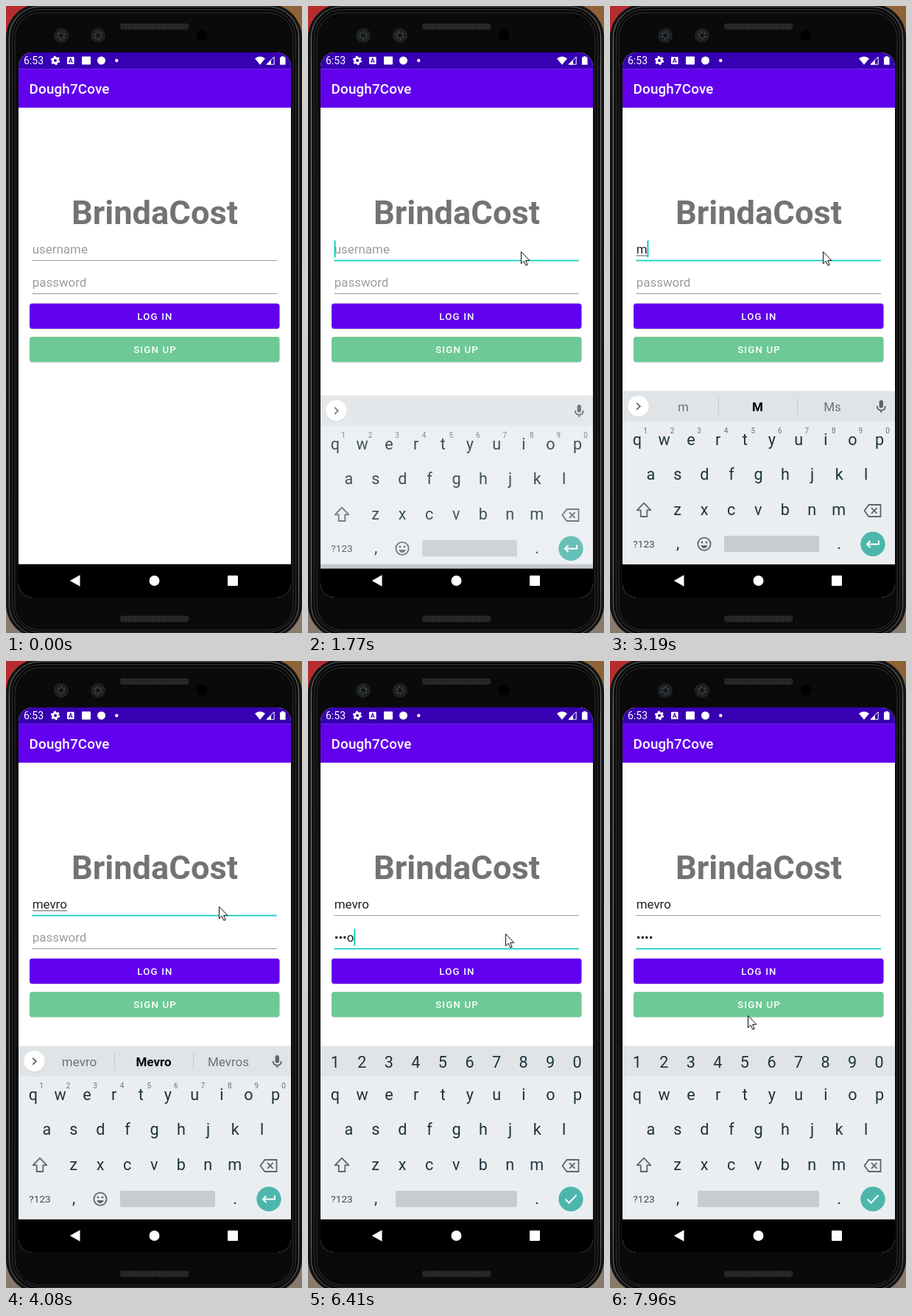
An HTML page for the animation above (8 s loop, 402x851 px).

```html
<!DOCTYPE html>
<html lang="en">
<head>
<meta charset="utf-8">
<title>Login screen</title>
<style>
  html, body { margin: 0; width: 100%; height: 100%; overflow: hidden; background: #0b0b0b; }
  svg { display: block; width: 402px; height: 851px; font-family: Roboto, Arial, sans-serif; }
  .mid { text-anchor: middle; }
  .medium { font-weight: 500; }
  .field { font-size: 16.96px; fill: #212121; }
  .hint { font-size: 16.96px; fill: #9c9c9c; }
  .btn { font-size: 13.2px; font-weight: 500; letter-spacing: 1.18px; fill: #fff; text-anchor: middle; }
  .key { font-size: 21.6px; fill: #1d333d; text-anchor: middle; }
  .sup { font-size: 10px; fill: #66737a; text-anchor: middle; }
  .sug { font-size: 17px; fill: #6a7378; text-anchor: middle; }
  .line { fill: none; stroke: #5b666c; stroke-width: 1.8; }
  .grey { fill: #5b666c; }
  .white { fill: none; stroke: #fff; stroke-width: 2; }
</style>
</head>
<body>
<svg viewBox="0 0 402 851">
  <defs>
    <clipPath id="screen"><rect x="17" y="63" width="370" height="740" rx="19"/></clipPath>
    <pattern id="mesh" width="3" height="3" patternUnits="userSpaceOnUse">
      <rect width="3" height="3" fill="#1d1d1d"/><circle cx="1.5" cy="1.5" r=".9" fill="#3c3c3c"/>
    </pattern>
    <linearGradient id="rim" x2="0" y2="1">
      <stop offset="0" stop-color="#4a4a4a"/><stop offset=".1" stop-color="#6a6a6a"/>
      <stop offset=".9" stop-color="#5c5c5c"/><stop offset="1" stop-color="#3a3a3a"/>
    </linearGradient>
  </defs>

  <!-- backdrop and phone body -->
  <rect width="402" height="851" fill="#877b6c"/>
  <rect width="201" height="400" fill="#b62d31"/>
  <rect x="201" width="201" height="400" fill="#8f6238"/>
  <rect x="0" y="-3" width="402" height="861" rx="46" fill="#131313"/>
  <rect x="4.5" y="1" width="393" height="853" rx="42" fill="#050505" stroke="url(#rim)" stroke-width="1.6"/>
  <rect x="8.5" y="5" width="385" height="845" rx="38" fill="none" stroke="#242424" stroke-width="2"/>
  <rect x="12" y="9" width="378" height="838" rx="34" fill="#0a0a0a" stroke="#333" stroke-width="1"/>
  <rect x="155" y="23.5" width="93" height="8.5" rx="3" fill="url(#mesh)"/>
  <rect x="155" y="827.5" width="93" height="8.5" rx="3" fill="url(#mesh)"/>
  <g id="cams"></g>
  <circle cx="266" cy="40" r="7.5" fill="#000"/>

  <g clip-path="url(#screen)">
    <rect x="17" y="63" width="370" height="740" fill="#fff"/>
    <rect x="17" y="63" width="370" height="22.5" fill="#3700b3"/>
    <rect x="17" y="85.3" width="370" height="52.7" fill="#6200ee"/>

    <!-- status bar -->
    <g fill="#fff">
      <text x="24" y="79.2" font-size="14">6:53</text>
      <circle cx="67" cy="74" r="3.4" fill="none" stroke="#fff" stroke-width="2.8"/>
      <circle cx="67" cy="74" r="5.2" fill="none" stroke="#fff" stroke-width="2" stroke-dasharray="2.7 2.745"/>
      <rect x="83" y="69" width="9.6" height="10" rx="1"/>
      <path d="M85.4 77l2.4-6 2.4 6M86.2 75.2h3.2" fill="none" stroke="#3700b3" stroke-width="1.1"/>
      <rect x="103" y="68.5" width="12" height="11" rx="1"/>
      <circle cx="129.5" cy="74" r="5.5"/>
      <circle cx="150.3" cy="74" r="2.2"/>
      <path d="M338 71.2q7-5.6 14 0l-7 8.6z"/>
      <path d="M354 79.2h10.2V69z" fill="none" stroke="#fff"/>
      <path d="M354 79.6l6-6v6z"/>
      <path d="M372 69.5h2v-1.3h3.6v1.3h2v10.3h-7.6z"/>
    </g>
    <text x="31.6" y="119" class="medium" font-size="18.84" letter-spacing=".15" fill="#fff">Dough7Cove</text>

    <!-- form -->
    <text x="202" y="296" class="mid" font-size="45.2" font-weight="700" fill="#737373">BrindaCost</text>
    <text id="hint1" x="35.7" y="336.3" class="hint">username</text>
    <text id="user" x="35.7" y="336.3" class="field"></text>
    <rect id="compose" x="36" y="338.4" height="1" fill="#555"/>
    <rect id="line1" x="35.5" width="332.5"/>
    <text id="hint2" x="35.7" y="381.4" class="hint">password</text>
    <text id="pass" x="35.7" y="381.4" class="field"></text>
    <rect id="line2" x="35.5" width="332.5"/>
    <rect id="caret" width="1.9" height="23" fill="#03cdbb"/>
    <rect x="32" y="405" width="339.5" height="34" rx="4" fill="#000" opacity=".13"/>
    <rect x="32" y="403.7" width="339.5" height="34.2" rx="3.6" fill="#6200ee"/>
    <text x="202.5" y="425.7" class="btn">LOG IN</text>
    <rect x="32" y="450.2" width="339.5" height="34" rx="4" fill="#000" opacity=".13"/>
    <rect x="32" y="449" width="339.5" height="34.2" rx="3.6" fill="#6dc995"/>
    <text x="202.5" y="471" class="btn">SIGN UP</text>

    <rect x="17" y="757.6" width="370" height="46" fill="#000"/>

    <g id="board">
      <rect x="17" y="522.5" width="370" height="42" fill="#e0e4e7"/>
      <rect x="17" y="564" width="370" height="193.6" fill="#eaeef1"/>
      <g id="keys"></g>

      <g id="strip">
        <circle cx="38.5" cy="544" r="14.3" fill="#000" opacity=".1"/>
        <circle cx="38.5" cy="543.3" r="14.2" fill="#fff"/>
        <path id="open" class="line" d="M36.2 538.8l4.6 4.5-4.6 4.5"/>
        <path id="close" class="line" d="M40.8 538.8l-4.6 4.5 4.6 4.5"/>
        <rect x="365.6" y="535" width="5.4" height="10.6" rx="2.7" class="grey"/>
        <path class="line" stroke-width="1.5" d="M362.8 543q0 5.8 5.5 5.8t5.5-5.8M368.3 549v3"/>
      </g>
      <g id="tools">
        <circle cx="86" cy="541.5" r="5" class="line"/>
        <path class="line" d="M89.8 545.2l6 6" stroke-width="2.2"/>
        <path class="line" d="M136 536h11a2 2 0 0 1 2 2v7l-5 5.500h-8a2 2 0 0 1-2-2v-10.500a2 2 0 0 1 2-2zM149 545h-3q-2 0-2 2v3M138 544q2 3.500 5 1.500"/>
        <path class="grey" d="M137.500 539.500h2v2h-2zM143.500 539.500h2v2h-2z"/>
        <text x="194.500" y="548.3" class="grey mid" font-size="14" font-weight="900">GIF</text>
        <rect x="242" y="536" width="15" height="15" rx="1.500" class="grey"/>
        <path d="M282.500 533v21" stroke="#c3c9cd"/>
        <g class="grey"><circle cx="310" cy="543.500" r="1.900"/><circle cx="316" cy="543.500" r="1.900"/><circle cx="322" cy="543.500" r="1.900"/></g>
      </g>
      <g id="words">
        <path d="M147.500 532v23M254.500 532v23" stroke="#c3c9cd"/>
        <text id="w0" x="99.500" y="550" class="sug"></text>
        <text id="w1" x="200.500" y="550" class="sug" style="fill:#000;font-weight:700"></text>
        <text id="w2" x="302" y="550" class="sug"></text>
      </g>

      <path class="line" d="M46 674.600l9.300 9.700h-5v8.700h-8.600v-8.700h-5z" stroke-linejoin="round"/>
      <path class="line" d="M345.500 685l6-8h16v16h-16zM355 681.200l7.600 7.600M362.600 681.200l-7.600 7.600"/>
      <text x="46" y="735.300" class="mid" font-size="13.600" fill="#3c4f58">?123</text>
      <text x="92" y="736" class="key">,</text>
      <text x="311" y="736.500" class="key">.</text>
      <rect id="space" y="719" height="22.300" rx="2" fill="#c7ccd0"/>
      <g id="emoji">
        <circle cx="128" cy="730.300" r="8.600" class="line"/>
        <circle cx="125" cy="728" r="1.400" class="grey"/><circle cx="131" cy="728" r="1.400" class="grey"/>
        <path class="grey" d="M123.300 732h9.400q-1.500 4-4.700 4t-4.700-4z"/>
      </g>
      <circle cx="357" cy="730.300" r="16.700" fill="#4db6ac"/>
      <path id="enter" class="white" d="M365 725.500v5h-15M353.500 726l-4.500 4.500 4.500 4.500"/>
      <path id="check" class="white" d="M349.500 730.500l5 5 10-10.500"/>
    </g>

    <g fill="#fff">
      <path d="M100.500 772.200v15.600l-13.700-7.800z"/>
      <circle cx="201.500" cy="780" r="7"/>
      <rect x="301" y="773" width="14" height="14" rx="1"/>
    </g>
  </g>

  <path id="mouse" d="M0 0v16.300l3.700-3.600 2.700 6 2.300-1-2.600-5.900h5.200z" fill="#fff" stroke="#111" stroke-width="1"/>
</svg>

<script>
const LOOP = 8000, NAME = 'mevro';
const $ = id => document.getElementById(id);

function add(parent, tag, attrs, text = '') {
  const el = document.createElementNS('http://www.w3.org/2000/svg', tag);
  for (const k in attrs) el.setAttribute(k, attrs[k]);
  el.textContent = text;
  return $(parent).appendChild(el);
}
const set = (id, attrs) => { for (const k in attrs) $(id).setAttribute(k, attrs[k]); };
const show = (id, on) => { $(id).style.display = on ? '' : 'none'; };

// last value whose time has passed
const at = (list, t) => list.reduce((v, [time, value]) => t >= time ? value : v, list[0][1]);
const within = (spans, t) => spans.some(([a, b]) => t >= a && t < b);

// camera lenses
for (const cx of [75, 125]) {
  add('cams', 'circle', { cx, cy: 40, r: 10, fill: '#1e2123' });
  for (let i = 0; i < 6; i++) {
    const a = i * Math.PI / 3 + cx;
    add('cams', 'circle', { cx: cx + 4.5 * Math.cos(a), cy: 40 + 4.5 * Math.sin(a), r: 1.2, fill: '#43484b' });
  }
  add('cams', 'circle', { cx, cy: 40, r: 1.6, fill: '#0a0c0e' });
}

// keyboard letters
const PITCH = 36.55;
const row = (chars, x, y, parent = 'keys', cls = 'key') =>
  [...chars].forEach((c, i) => add(parent, 'text', { x: x + i * PITCH, y, class: cls }, c));
add('keys', 'g', { id: 'sups' });
add('keys', 'g', { id: 'digits' });
row('qwertyuiop', 37, 595.5);
row('asdfghjkl', 55.3, 642.8);
row('zxcvbnm', 91.5, 690.8);
row('1234567890', 48, 580.3, 'sups', 'sup');
row('1234567890', 36.7, 551.8, 'digits');

const FOCUS1 = 1290, FOCUS2 = 4640, SWAP = 4680;
const typed = [[0, 0], [3070, 1], [3230, 2], [3330, 3], [3430, 4], [3580, 5]];
const secret = [[0, ''], [5510, 'p'], [5820, '•a'], [6160, '••l'], [6410, '•••o'], [7910, '••••']];
const blink = [[FOCUS1, 1890], [2390, 2880], [3070, 4080], [FOCUS2, 5140], [5510, 6940], [7430, 7940]];
const slide = [[0, [48, 0]], [1720, [48, .3]], [1770, [6, .85]], [1830, [0, 1]]];

// start, end, steps, from, to
const moves = [
  [750, 1250, 8, [377.5, 418.5], [289.5, 333.5]],
  [4170, 4560, 7, [289.5, 333.5], [268.5, 370.5]],
  [7280, 7960, 12, [268.5, 370.5], [187.5, 481.5]]
];
function mouseAt(t) {
  let pos = moves[0][3];
  for (const [a, b, n, from, to] of moves) {
    if (t < a) break;
    const p = Math.min(1, Math.floor((t - a) / (b - a) * n + 1e-6) / n);
    const e = p * p * (3 - 2 * p);
    pos = from.map((v, i) => v + (to[i] - v) * e);
  }
  return pos;
}

function underline(id, y, on) {
  set(id, on ? { y: y - .6, height: 1.8, fill: '#14cfc0' } : { y: y - .3, height: 1, fill: '#989898' });
}

function render(t) {
  const user = NAME.slice(0, at(typed, t)), pass = at(secret, t);
  const second = t >= FOCUS2, digits = t >= SWAP;

  $('user').textContent = user;
  $('pass').textContent = pass;
  show('hint1', !user);
  show('hint2', !pass);
  underline('line1', 345.2, t >= FOCUS1 && !second);
  underline('line2', 390.3, second);

  const userWidth = user ? $('user').getComputedTextLength() : 0;
  const passWidth = pass ? $('pass').getComputedTextLength() : 0;
  show('compose', user && !second);
  set('compose', { width: userWidth });
  show('caret', within(blink, t));
  set('caret', { x: 35.6 + (second ? passWidth : userWidth), y: second ? 363.5 : 318.3 });

  const [dy, alpha] = at(slide, t);
  show('board', alpha > 0);
  set('board', { transform: `translate(0 ${dy})`, opacity: alpha });

  const words = t >= 3130 && !digits, tools = t >= 1830 && t < 3130;
  show('strip', !digits);
  show('tools', tools);
  set('tools', { opacity: t < 1890 ? .5 : 1 });
  show('close', tools);
  show('open', !tools);
  show('words', words);
  const cap = user.charAt(0).toUpperCase() + user.slice(1);
  [user, cap, cap + 's'].forEach((w, i) => { $('w' + i).textContent = w; });

  show('digits', digits);
  show('check', digits);
  show('sups', !digits);
  show('emoji', !digits);
  show('enter', !digits);
  set('space', digits ? { x: 119, width: 165 } : { x: 155, width: 129 });

  show('mouse', t >= 750);
  set('mouse', { transform: `translate(${mouseAt(t)})` });
}

function frame() {
  render(performance.now() % LOOP);
  requestAnimationFrame(frame);
}
frame();
</script>
</body>
</html>
```
